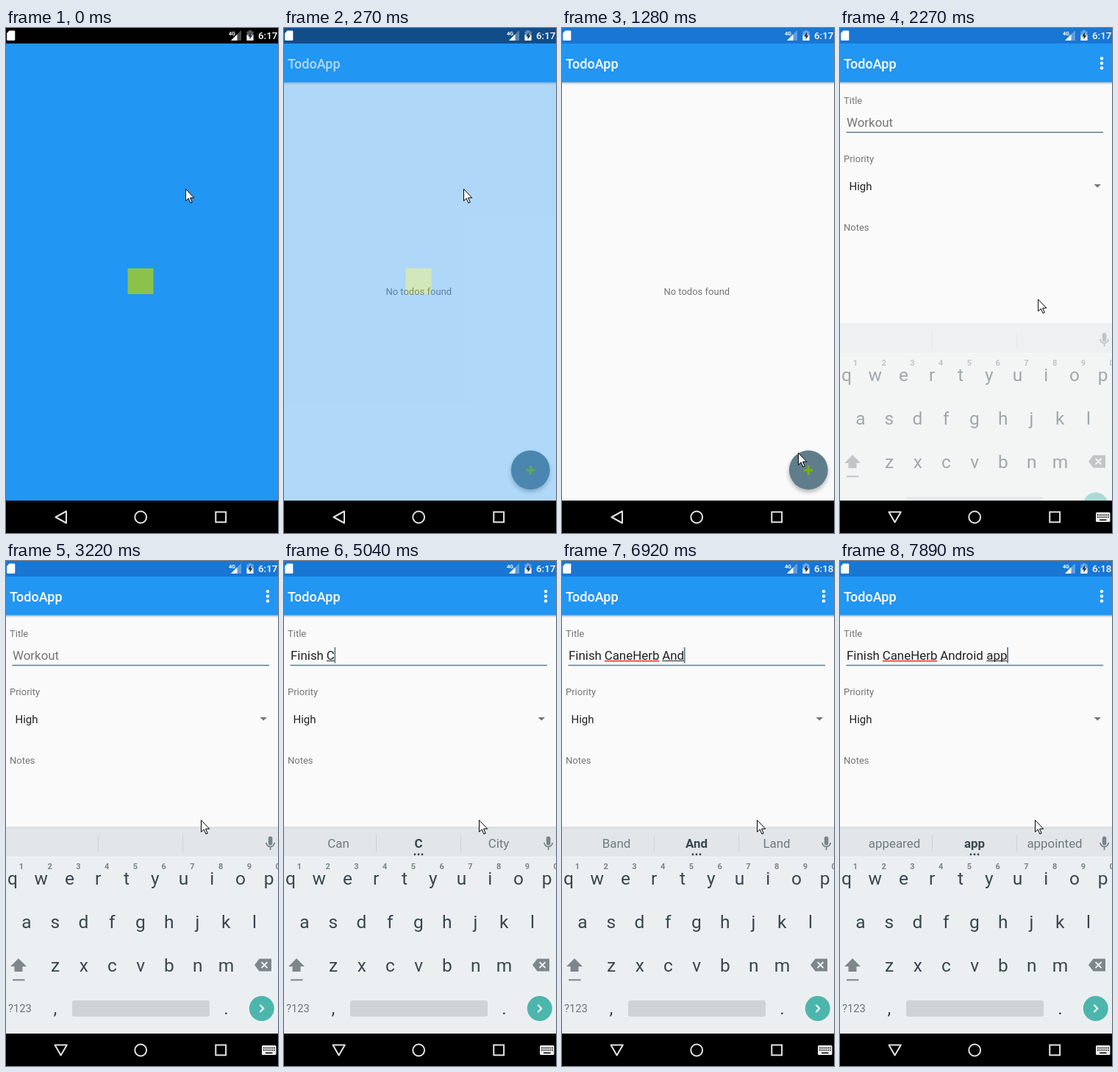
Recreate the animation shown at these times as an HTML page. Size 370x685 px, loop 8 s.

```html
<!DOCTYPE html>
<html lang="en">
<head>
<meta charset="utf-8">
<title>Todo list</title>
<style>
html, body { margin: 0; width: 100%; height: 100%; overflow: hidden; background: #000; }
svg { display: block; font-family: Roboto, sans-serif; }
text { white-space: pre; }
.mid { text-anchor: middle; }
.bar { font-size: 18px; font-weight: 500; fill: #fff; }
.label { font-size: 13px; fill: #757575; }
.edit { font-size: 16.9px; fill: #212121; }
.key { font-size: 24.5px; fill: #37474f; }
.digit { font-size: 11px; font-weight: 700; fill: #78868c; }
.hint { font-size: 16.9px; fill: #6f7a80; }
.line { fill: none; stroke: #e4e4e4; stroke-width: 2; }
</style>
</head>
<body>
<svg width="370" height="685">
  <defs>
    <linearGradient id="shade" x2="0" y2="1">
      <stop stop-opacity=".28"/><stop offset="1" stop-opacity="0"/>
    </linearGradient>
    <filter id="blur" x="-30%" y="-30%" width="160%" height="160%"><feGaussianBlur stdDeviation="3"/></filter>
    <g id="appBar">
      <rect y="73" width="370" height="4" fill="url(#shade)"/>
      <rect y="21" width="370" height="52.5" fill="#2196f3"/>
      <text class="bar" x="5" y="54.5">TodoApp</text>
    </g>
  </defs>

  <rect width="370" height="641" fill="#fafafa"/>
  <rect width="370" height="21" fill="#1976d2"/>
  <use href="#appBar"/>
  <text class="label mid" x="183.3" y="362">No todos found</text>
  <circle cx="335" cy="603" r="26" opacity=".3" filter="url(#blur)"/>
  <circle cx="335.3" cy="599.5" r="26.4" fill="#607d8b"/>
  <path d="M329 599.7h12.5M335.3 593.5v12.5" stroke="#7cb305" stroke-width="3"/>

  <g id="form">
    <rect y="21" width="370" height="640" fill="#fafafa"/>
    <use href="#appBar"/>
    <g fill="#fff"><circle cx="356" cy="41.3" r="2.2"/><circle cx="356" cy="47.8" r="2.2"/><circle cx="356" cy="54.2" r="2.2"/></g>
    <text class="label" x="5" y="103">Title</text>
    <text id="sample" class="edit" x="9" y="134" style="fill:#757575">Workout</text>
    <g id="words"></g>
    <path d="M8.5 141.5H358" stroke="#607d8b" stroke-width="1.6"/>
    <path id="under" stroke="#212121"/>
    <path id="wrong" d="M58 135.7H132" stroke="#f03a36" stroke-width="1.8"/>
    <path id="caret" stroke="#607d8b" stroke-width="1.8"/>
    <text class="label" x="5" y="182">Priority</text>
    <text x="12.5" y="220" font-size="15" fill="#212121">High</text>
    <path d="M345.5 212h9.5l-4.75 4.6z" fill="#757575"/>
    <text class="label" x="5" y="275">Notes</text>
  </g>

  <g id="board">
    <rect y="360.5" width="370" height="3" fill="#d9dcde"/>
    <rect y="362.5" width="370" height="40" fill="#e2e6e8"/>
    <rect y="401" width="370" height="240" fill="#eceff1"/>
    <path d="M0 401.5H370" stroke="#f4f6f7"/>
    <path d="M125.5 371.5v23M240.5 371.5v23" stroke="#cdd3d6"/>
    <g id="hints"></g>
    <g id="dots" fill="#37474f"><circle cx="178" cy="398" r="1.4"/><circle cx="183" cy="398" r="1.4"/><circle cx="188" cy="398" r="1.4"/></g>
    <rect x="356.8" y="373.5" width="5.6" height="12" rx="2.8" fill="#78868c"/>
    <path d="M354 382a5.6 5.6 0 0 0 11.2 0M359.6 388v4" fill="none" stroke="#78868c" stroke-width="1.8"/>
    <g id="keys"></g>
    <path d="M17 539l11 11h-5.5v7h-11v-7H6z" fill="#7d878c"/>
    <path d="M9 568.3h16.5" stroke="#7d878c" stroke-width="2"/>
    <path d="M344.5 539.5H361v17H344.5L338 548z" fill="#7d878c"/>
    <path d="M347.5 544l8 8m0-8l-8 8" stroke="#eceff1" stroke-width="1.8"/>
    <text x="3" y="612" font-size="14.7" fill="#67757c">?123</text>
    <rect x="90" y="596" width="187" height="22" rx="3" fill="#cfd3d6"/>
    <circle cx="347.8" cy="607" r="17" fill="#4db6ac"/>
    <path d="M345.3 602l5 5-5 5" fill="none" stroke="#fff" stroke-width="2"/>
  </g>

  <g id="splash">
    <rect width="370" height="21"/>
    <rect y="21" width="370" height="620" fill="#2196f3"/>
    <rect x="165.5" y="326" width="35" height="35" fill="#8bc34a"/>
  </g>

  <path d="M4.5 3.5H11a1.3 1.3 0 0 1 1.3 1.3V15.7A1.3 1.3 0 0 1 11 17H2.5a1.3 1.3 0 0 1-1.3-1.3V7z" fill="#fff"/>
  <g fill="#fff">
    <text x="303" y="9.7" font-size="7.2" font-weight="700">4G</text>
    <path d="M320 3v14h-14z" opacity=".3"/>
    <path d="M314.5 8.5v8.5h-8.5z"/>
    <path d="M330 3h4v1.5h2.5V17h-9V4.5h2.5z" opacity=".35"/>
    <path d="M327.500 9.500h9V17h-9z"/>
  </g>
  <path d="M333 6l-4 5.500h2.500V15.500l4-5.500h-2.500z" fill="#234"/>
  <text id="clock" x="343" y="15.3" font-size="13.4" font-weight="500" fill="#fff"></text>

  <rect y="641" width="370" height="44"/>
  <path id="back" class="line" stroke-linejoin="round"/>
  <circle class="line" cx="183.2" cy="663.5" r="7.9"/>
  <rect class="line" x="285.3" y="656.5" width="13.800" height="13.800"/>
  <g id="ime">
    <rect x="348" y="657" width="19.500" height="13" rx="1.500" fill="#eee"/>
    <path d="M350 660.500h16M350 663.500h16" stroke="#000" stroke-width="1.700" stroke-dasharray="1.700 1.100"/>
    <path d="M353 667.300h9.500" stroke="#000" stroke-width="1.500"/>
  </g>
  <path id="mouse" d="M.5.5V16.500l3.700-3.400 2.700 6.200 2.300-1-2.700-6H11.700z" fill="#fff" stroke="#000"/>
</svg>
<script>
const $ = id => document.getElementById(id);
const set = (el, attrs) => { for (const k in attrs) el.setAttribute(k, attrs[k]); };
const show = (el, on) => { el.style.display = on ? '' : 'none'; };
function addText(parent, cls, x, y, content = '') {
  const el = document.createElementNS('http://www.w3.org/2000/svg', 'text');
  set(el, { class: cls, x, y });
  el.textContent = content;
  return parent.appendChild(el);
}

// Keyboard letters
[['qwertyuiop', 9, 439], ['asdfghjkl', 28, 498], ['zxcvbnm', 67, 557]].forEach(([row, x, y]) =>
  [...row].forEach((c, i) => addText($('keys'), 'key mid', x + 38.75 * i, y, c)));
[...'1234567890'].forEach((c, i) => addText($('keys'), 'digit mid', 21 + 38.75 * i, 418, c));
addText($('keys'), 'key mid', 67, 615, ',');
addText($('keys'), 'key mid', 299.5, 615, '.');

const wordX = [9, 57.7, 136.2, 199.3];
const words = wordX.map(x => addText($('words'), 'edit', x, 134));
const hints = [74, 183, 292].map(x => addText($('hints'), 'hint mid', x, 389));
hints[1].style.cssText = 'font-weight:700;fill:#37474f';

// Time, typed text, left and right suggestion
const typing = [
  [0, ''],
  [3500, 'F'], [3640, 'Fi', 'Fit', 'Find'], [3780, 'Fin', 'Fine', 'Find'],
  [3920, 'Fini', 'Find', 'Finish'], [4060, 'Finis', 'Fins', 'Finish'],
  [4210, 'Finish', 'Fish', 'Finished'], [4490, 'Finish '],
  [4900, 'Finish C'], [5040, 'Finish C', 'Can', 'City'],
  [5170, 'Finish Ca', 'Can', 'Car'], [5300, 'Finish Can', 'Cab', "Can't"],
  [5430, 'Finish Cane', 'Cape', 'Canes'], [5560, 'Finish CaneH', 'Cane', 'Canes'],
  [5700, 'Finish CaneHe', 'Cane', 'Canes'], [5830, 'Finish CaneHer', 'Cane', 'Caner'],
  [5960, 'Finish CaneHerb', 'Cane Herb', 'Canes'], [6230, 'Finish CaneHerb '],
  [6510, 'Finish CaneHerb A'], [6650, 'Finish CaneHerb A', 'As', 'At'],
  [6780, 'Finish CaneHerb An', 'As', 'And'], [6920, 'Finish CaneHerb And', 'Band', 'Land'],
  [7070, 'Finish CaneHerb Andr', 'Andes', 'Android'], [7210, 'Finish CaneHerb Andro', 'Andes', 'Android'],
  [7340, 'Finish CaneHerb Androi', 'Android', 'Androids'], [7480, 'Finish CaneHerb Android', 'Androids', 'Andorra'],
  [7620, 'Finish CaneHerb Android a', 'as', 'and'], [7750, 'Finish CaneHerb Android ap', 'app', 'apt'],
  [7890, 'Finish CaneHerb Android app', 'appeared', 'appointed']
];

// Stepped, eased progress between two times
function glide(t, from, to, steps) {
  const p = Math.min(1, Math.max(0, Math.floor((t - from) / (to - from) * steps + 1e-6) / steps));
  return p * p * (3 - 2 * p);
}

function drawField(t) {
  const [, typed, left = '', right = ''] = typing.findLast(s => s[0] <= t);
  const parts = typed.split(' ');
  const last = parts.length - 1;
  words.forEach((el, i) => { el.textContent = parts[i] || ''; });
  show($('sample'), !typed);
  const end = parts[last] ? wordX[last] + words[last].getComputedTextLength() : wordX[last];
  set($('under'), { d: parts[last] ? `M${wordX[last]} 135.500H${end}` : '' });
  show($('wrong'), last > 1);
  set($('caret'), { d: `M${end + .6} 117V138.500` });
  show($('caret'), typed || (t >= 2790 && t < 3220));
  [left, left && parts[last], right].forEach((s, i) => { hints[i].textContent = s; });
  show($('dots'), left);
}

function draw(t) {
  set($('splash'), { opacity: t < 270 ? 1 : t < 420 ? .34 : 0 });
  const out = glide(t, 270, 1280, 7), up = glide(t, 1570, 2390, 6);
  set($('mouse'), { transform: `translate(${244 + 77 * out - 56 * up} ${218 + 358 * out - 225 * up})` });

  const opening = t < 1710;
  set($('form'), { opacity: t < 1570 ? 0 : opening ? .4 : 1, transform: `translate(0 ${opening ? 18 : 0})` });
  set($('board'), {
    opacity: t < 2250 ? 0 : t < 2390 ? .45 : t < 2510 ? .9 : 1,
    transform: `translate(0 ${t < 2390 ? 40 : t < 2510 ? 9 : 0})`
  });
  const keyboard = t >= 2250;
  set($('back'), { d: keyboard ? 'M66.500 656.500H82.800L74.600 670.500z' : 'M82 655.500V671.500L67.500 663.500z' });
  show($('ime'), keyboard);
  $('clock').textContent = t < 6370 ? '6:17' : '6:18';
  drawField(t);
}

const start = performance.now();
function tick() {
  draw((performance.now() - start) % 8000);
  requestAnimationFrame(tick);
}
tick();
</script>
</body>
</html>
```
